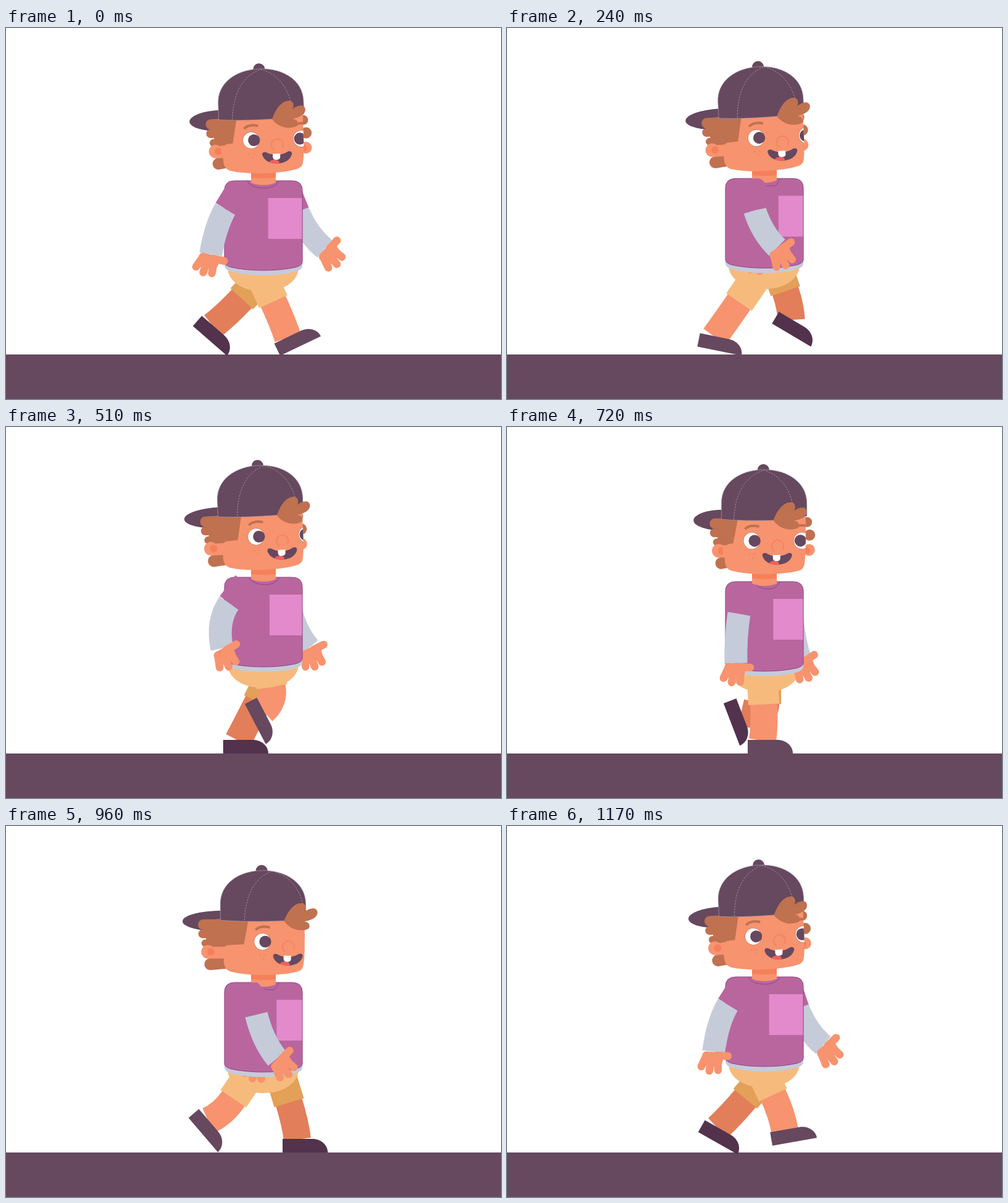
Write an HTML page with a canvas that moves like this. It is 800 px wide and 600 px high and loops after 1.2 s.

```html
<!DOCTYPE html>
<html lang="en">
<head>
<meta charset="utf-8">
<title>Walking boy</title>
<style>
  html, body { margin: 0; width: 100%; height: 100%; overflow: hidden; background: #fff; }
  canvas { display: block; }
</style>
</head>
<body>
<canvas id="stage" width="800" height="600"></canvas>
<script>
const ctx = document.getElementById('stage').getContext('2d');
const CYCLE = 600, STEP = 30, RAD = Math.PI / 180;
const FAR_ARM_X = 65, FAR_LEG_X = 20;

const C = {
  plum: '#66485f', plumDark: '#52324c', skin: '#f7936f', skinFar: '#e27e59',
  blush: '#f5805a', hair: '#bf7150', shirt: '#b9669e', seam: '#8e4585',
  pocket: '#e28acb', sleeve: '#c5cbd9', shorts: '#f6bb7c', shortsFar: '#e2a058',
  stitch: '#a898a8', tongue: '#f2605c'
};

// time, sleeve end x y, cuff angle, elbow x y, wrist x y, hand angle
const ARM = [
  [0, 354.5, 292.5, 31.5, 338, 322, 331, 366, 10],
  [120, 375, 299, 11, 369, 337, 370, 379, 0],
  [210, 395, 299, -5, 403, 335, 425, 361, -29],
  [300, 407, 297, -22, 423, 335, 450, 357, -51],
  [360, 404.5, 299, -13, 415, 342, 438, 370, -49],
  [420, 395, 300, -6, 398, 340, 409, 374, -38],
  [510, 360.5, 288.5, 36.5, 340, 319, 349, 362, -33],
  [570, 357, 292, 32, 340, 321, 334, 368, 0]
];

// time, shorts end x y, hem angle, heel x y, sole angle
const LEG = [
  [0, 432, 442.5, -24.5, 443, 530, -25.5],
  [60, 437.5, 447.5, -17, 427, 528, 0],
  [120, 415, 448.5, -3, 389, 528, 0],
  [210, 387, 445, 27, 331, 528, 0],
  [270, 365, 441, 40, 289, 495, 29.5],
  [300, 361, 438, 43, 282, 482, 41],
  [360, 367.5, 441, 34, 295, 472, 49.5],
  [420, 398, 448, 0, 330, 447, 69],
  [510, 430, 420, -10, 386, 448, 62.5],
  [570, 430, 435, -25, 429, 517, -10]
];

const BOB = [[0, 0], [60, 6], [120, 3], [210, -4], [270, -3]];

// Periodic monotone cubic interpolation of every column.
function pose(rows, time, period = CYCLE) {
  const n = rows.length, t = ((time % period) + period) % period;
  const at = i => rows[((i % n) + n) % n];
  const when = i => at(i)[0] + Math.floor(i / n) * period;
  let k = n - 1;
  while (rows[k][0] > t) k--;
  const h = when(k + 1) - when(k), s = (t - when(k)) / h;
  return rows[0].slice(1).map((_, j) => {
    const v = i => at(i)[j + 1];
    const secant = i => (v(i + 1) - v(i)) / (when(i + 1) - when(i));
    const slope = i => {
      const a = secant(i - 1), b = secant(i);
      return a * b <= 0 ? 0 : 2 * a * b / (a + b);
    };
    return v(k) * (1 + 2 * s) * (1 - s) ** 2 + v(k + 1) * s * s * (3 - 2 * s)
      + h * slope(k) * s * (1 - s) ** 2 + h * slope(k + 1) * s * s * (s - 1);
  });
}

const wave = (t, peak, period) => Math.cos((t - peak) / period * 2 * Math.PI);

function fill(path, color) {
  ctx.fillStyle = color;
  ctx.fill(new Path2D(path));
}

function line(path, color, width, cap = 'butt') {
  ctx.strokeStyle = color;
  ctx.lineWidth = width;
  ctx.lineCap = cap;
  ctx.lineJoin = 'round';
  ctx.stroke(new Path2D(path));
}

function oval(x, y, rx, ry, color) {
  ctx.fillStyle = color;
  ctx.beginPath();
  ctx.ellipse(x, y, rx, ry, 0, 0, 2 * Math.PI);
  ctx.fill();
}

const dot = (x, y, r, color) => oval(x, y, r, r, color);

function group(draw, x = 0, y = 0, angle = 0) {
  ctx.save();
  ctx.translate(x, y);
  ctx.rotate(angle * RAD);
  draw();
  ctx.restore();
}

// A short straight piece of cloth ending at x, y.
function cuff(x, y, angle, length, width, color) {
  group(() => {
    ctx.fillStyle = color;
    ctx.fillRect(-width / 2, -length, width, length);
  }, x, y, angle);
}

function leg(t, skin, cloth, shoe) {
  const [x, y, hem, heelX, heelY, sole] = pose(LEG, t);
  const c = Math.cos(sole * RAD), s = Math.sin(sole * RAD);
  const ankleX = heelX + 24 * c + 21 * s, ankleY = heelY + 24 * s - 21 * c;
  const reach = 0.55 * Math.hypot(ankleX - x, ankleY - y);
  const downX = -Math.sin(hem * RAD), downY = Math.cos(hem * RAD);
  line(`M${x - 12 * downX},${y - 12 * downY} L${x},${y}
    Q${x + reach * downX},${y + reach * downY} ${ankleX},${ankleY}`, skin, 44);
  cuff(x, y, hem, 45, 50, cloth);
  group(() => fill('M0,0 V-22 H48 C62,-22 73,-12 73,0 Z', shoe), heelX, heelY, sole);
}

function arm(t) {
  const [x, y, edge, elbowX, elbowY, wristX, wristY, turn] = pose(ARM, t);
  line(`M${x},${y} Q${elbowX},${elbowY} ${wristX},${wristY}`, C.sleeve, 37);
  cuff(x, y, edge, 42, 37, C.shirt);
  group(() => {
    const palm = 'M-12,6 L10,8 L7,18 L-11,16 Z';
    fill(palm, C.skin);
    line(palm, C.skin, 13);
    line('M-13,9 L-20,24 M-4,12 L-7,31 M7,12 L7,30 M5,6 L23,7', C.skin, 12.5, 'round');
  }, wristX, wristY, turn);
}

function torso(t) {
  const shift = 7.6 - 8 * wave(t, -15, CYCLE);
  const body = `M353,263 Q353,247 370,247 H462 Q479,247 479,263 V378
    Q479,384 468,387 Q445,392 416,392 Q387,392 364,387 Q353,384 353,378 Z`;
  group(() => fill('M353,375 H479 V384 Q479,391 468,394 Q445,400 416,400 Q387,400 364,394 Q353,391 353,384 Z', C.sleeve));
  fill(body, C.shirt);
  ctx.fillStyle = C.pocket;
  ctx.fillRect(424 + shift, 275, 55 - shift, 66);
  line(body, C.seam, 1);

  fill('M396,228 H436 V250 Q428,254 416,254 Q404,254 396,250 Z', C.skin);
  fill('M396,228 H436 V242 Q416,244 396,242 Z', C.blush);
  const fold = (shift - 8) / 6;
  if (fold > 0) fill(`M395,247 H${396 + 10 * fold} Q${396 + 15 * fold},248 ${396 + 19 * fold},255 H395 Z`, C.shirt);
  const left = 390 + 2 * shift;
  line(`M${left},${247 + shift * 0.8} Q${left + 6},259 ${(left + 441) / 2 + 3},259 Q436,258 441,248`, C.seam, 1);
}

const FACE = `M352,130 V212 Q352,225 362,229 Q385,235 416,235 Q450,235 470,230
  Q480,228 481,218 Q483,205 483,180 V125 Z`;
const CAP = 'M347,146 V120 C347,86 378,66 416,66 C454,66 485,87 485,120 V141 Q465,148 430,148 Q380,149 347,146 Z';

function eye(x, pupilX) {
  dot(x, 181, 13.8, C.hair);
  dot(x, 181, 13.2, '#fff');
  dot(pupilX, 181, 9.6, C.plum);
}

function features() {
  line('M384,162 Q392,154 407,158', C.hair, 4);
  eye(395, 399.5);
  line('M432,198 A9.6,9.6 0 1 1 445,195', C.blush, 1.6);
  for (const [x, y] of [[391, 203], [399, 203], [397, 209], [475, 203], [477, 209]]) dot(x, y, 1.2, C.blush);
  group(() => {
    const mouth = `M418,201 Q426,206 436,206 Q446,206 454,201 Q460,200 460,205
      Q456,219 436,220 Q416,219 412,205 Q412,200 418,201 Z`;
    fill(mouth, C.plum);
    ctx.clip(new Path2D(mouth));
    oval(431, 218, 8, 4.5, C.tongue);
  });
  fill('M429,204 H441 V209 Q441,214 435,214 Q429,214 429,209 Z', '#fff');
}

function head(k) {
  const near = 20 * k, back = 18 * k;

  oval(350, 147.5, 47.5 + 17 * k, 17, C.plum);
  line(`M${347 - 17 * k},217 L356,215`, C.hair, 19, 'round');
  const side = 16 * k;
  dot(486 - side, 151, 8, C.hair);
  dot(490 - side, 172, 9, C.hair);
  dot(489 - side, 196, 9.5, C.skin);
  dot(485 - side, 197, 5.5, C.blush);

  fill(FACE, C.skin);
  const earX = 343 - 16.5 * k;
  ctx.fillStyle = C.skin;
  ctx.fillRect(earX, 186, 358 - earX, 22);

  // side hair, with three rounded locks at the back
  fill(`M${372 + near},140 V148 L${365 + near},185 L${342 - back},188 L${340 - back},146 Z`, C.hair);
  line(`M${337 - back},153 H360`, C.hair, 17, 'round');
  line(`M${336 - back},168 H360`, C.hair, 14, 'round');
  line(`M${340 - back},183 H352`, C.hair, 12, 'round');
  dot(earX, 197, 11, C.skin);
  dot(earX + 4.5, 197, 6, C.blush);
  if (k < 0.5) {
    ctx.fillStyle = C.skin;
    ctx.fillRect(349, 188, 8, 20);
  }

  group(() => {
    ctx.clip(new Path2D(FACE));
    group(() => {
      line('M467,158 Q476,154 488,159', C.hair, 4);
      eye(476, 473.5);
    }, 22 * k);
    group(features, near);
  });

  dot(415 - k, 66.5, 9.5, C.plum);
  fill(CAP, C.plum);
  line(CAP, C.stitch, 0.7);
  group(() => {
    ctx.clip(new Path2D(CAP));
    ctx.setLineDash([2.5, 2]);
    const top = 415 + 16 * k;
    line(`M${366 + near},146 C${368 + near},105 ${384 + near},76 ${top},67
      C${442 + near * 0.9},74 ${460 + near},100 ${463 + near},135`, C.stitch, 0.9);
  });

  group(() => fill(`M430,148 C436,132 446,119 458,119 C466,119 467,128 463,133
    C468,129 482,123 484,133 C485,144 471,147 463,149
    C470,149 473,155 470,160 C460,166 440,163 430,148 Z`, C.hair), near);
}

function draw(t) {
  ctx.fillStyle = '#fff';
  ctx.fillRect(0, 0, 800, 600);
  ctx.fillStyle = C.plum;
  ctx.fillRect(0, 528, 800, 72);

  const [bob] = pose(BOB, t, CYCLE / 2);
  const opposite = t + CYCLE / 2;
  const tilt = -1.45 + 1.5 * wave(t, 92, CYCLE / 2);
  const turn = 0.5 - 0.5 * wave(t, 80, CYCLE);

  group(() => leg(opposite, C.skinFar, C.shortsFar, C.plumDark), FAR_LEG_X);
  leg(t, C.skin, C.shorts, C.plum);
  group(() => {
    fill('M358.5,385 V392 C362,412 385,426 415.5,426 C446,426 469,412 472.5,392 V385 Z', C.shorts);
    group(() => arm(opposite), FAR_ARM_X);
    torso(t);
    group(() => {
      ctx.translate(-416, -240);
      head(turn);
    }, 416, 240, tilt);
    arm(t);
  }, 0, bob);
}

function frame() {
  draw(Math.floor(performance.now() / STEP) * STEP % CYCLE);
  requestAnimationFrame(frame);
}
frame();
</script>
</body>
</html>
```
